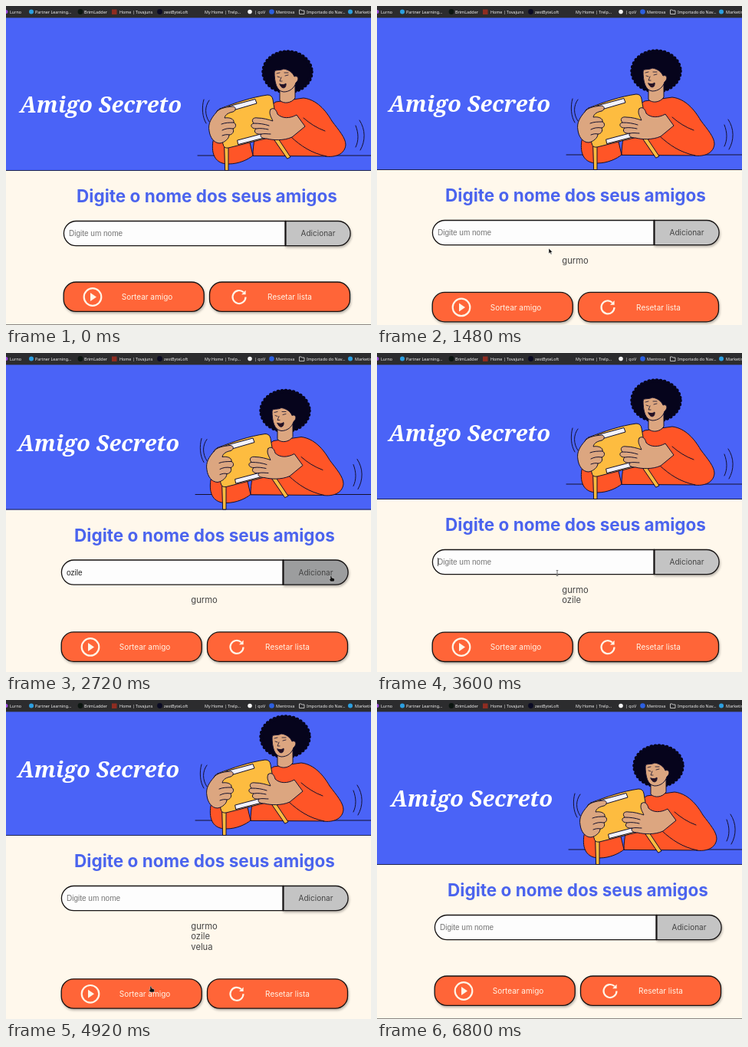
Recreate the animation shown at these times as an HTML page. Size 476 by 416 pixels, loop 7970 ms.

```html
<!DOCTYPE html>
<html lang="pt-BR">
<head>
<meta charset="utf-8">
<title>Amigo Secreto</title>
<style>
  html, body { margin: 0; width: 100%; height: 100%; overflow: hidden; background: #fff8ec; }
  svg { display: block; width: 100%; height: 100%; }
  text { font-family: Inter, sans-serif; white-space: pre; }
  .logo { font: italic 700 29px "Noto Serif", serif; fill: #fff; }
  .heading { font-size: 22.5px; font-weight: 700; fill: #4b64ee; text-anchor: middle; }
  .field { font: 10px "Liberation Sans", sans-serif; }
  .label { font-size: 10px; text-anchor: middle; }
  .list { font-size: 11.2px; fill: #444; }
  .result { font-size: 13.6px; font-weight: 700; fill: #2fdc45; text-anchor: middle; }
  .bar text { font: 500 5.4px "Noto Sans", sans-serif; fill: #eee; }
  .dialog text { font: 5.4px "Noto Sans", sans-serif; fill: #55585c; }
  .dialog .origin { font-size: 7px; font-weight: 500; fill: #26282b; }
  .outline { stroke: #151212; stroke-width: 1.3; }
  .shadow { filter: drop-shadow(1px 2.5px 1.5px rgba(0, 0, 0, .28)); }
  .ink { stroke: #14102c; stroke-width: 1; stroke-linejoin: round; stroke-linecap: round; }
  .line { fill: none; }
  .skin { fill: #dca680; }
  .shirt { fill: #ff5527; }
  .drum { fill: #fdbc40; }
  .icon { fill: none; stroke: #fff4e6; stroke-width: 2.2; }
</style>
</head>
<body>
<svg viewBox="0 0 476 416">
  <rect width="476" height="416" fill="#fff8ec"/>

  <g id="page">
    <rect x="-5" y="0" width="490" height="215" fill="#4a63f7"/>
    <path d="M-5 214.5H485" stroke="#20244e"/>
    <text class="logo" x="18" y="138.5">Amigo Secreto</text>

    <g class="ink">
      <path class="line" d="M250 195H485"/>
      <path class="line" d="M265 123C259 131 259 142 265 151M258 122C255 132 256 145 261 153M456 156C460 166 460 176 456 184M461 149C469 161 469 176 462 188"/>
      <path class="shirt" d="M322 195C322 165 335 135 352 125L388 120C405 122 417 136 425 150C434 162 443 172 443 181C442 193 430 198 416 196Z"/>
      <path class="line" d="M418 196C398 192 384 182 372 171M388 146C396 153 405 159 416 163"/>
      <g fill="#06041c" stroke="#06041c">
        <ellipse cx="367" cy="86" rx="31" ry="26"/>
        <ellipse cx="367" cy="86" rx="31" ry="26" stroke-width="5.5" stroke-dasharray="0 5"/>
      </g>
      <path class="skin" d="M357 106V123C362 128 372 127 377 120V102Z"/>
      <path class="skin" d="M350 86C351 82 357 85 362 82C369 83 374 87 376 92C381 90 383 96 378 100C376 107 370 112 362 112C353 111 350 100 350 86Z"/>
      <path d="M357 102C360 103 363 103 365 101C366 107 360 110 357 102Z" fill="#2a1020"/>
      <path class="line" d="M354 92l3 1M364 91l4-1M353 88l4-1M363 87l5 0M359 93l-2 5 3 0" stroke-width=".8"/>
      <path class="shirt" d="M270 176C267 195 274 206 290 206C304 206 316 200 322 195L318 178Z"/>
      <path class="drum" d="M285 182H290V214.5H286ZM345 167L349 164L371 197L367 199Z"/>
      <path class="drum" d="M279 134C300 126 320 119 341 116Q347 116 348 122L355 163Q356 168 350 170L290 185Q284 186 283 180L274 140Q274 136 279 134Z"/>
      <path d="M290 131L325 121.5L327 127L291 137.5ZM302 175L338 165.5L340 171L303 180.5Z" fill="#f2f2fa"/>
      <path class="skin" d="M274 139C278 133 287 132 295 131C300 131 301 136 296 138C291 139 286 141 285 146C291 145 298 147 297 152C301 154 300 159 296 160C298 164 295 168 291 168C291 173 285 178 279 179C271 179 266 171 265 163C263 153 268 146 274 139Z"/>
      <path class="line" d="M297 152C291 152 286 152 281 154M296 160C290 159 286 160 282 162M291 168C288 167 285 168 282 169"/>
      <path class="skin" d="M345 135C349 131 353 136 354 141C360 147 370 147 379 142L390 157L373 171C362 176 348 175 340 173C334 173 330 170 333 167C326 168 322 164 326 160C319 160 318 154 323 153C319 148 323 145 328 146C335 146 342 148 348 150C346 145 342 140 345 135Z"/>
      <path class="line" d="M323 153C331 153 337 154 343 156M326 160C332 159 337 160 342 161M333 167C337 166 341 167 345 167"/>
    </g>

    <text class="heading" x="262" y="256">Digite o nome dos seus amigos</text>

    <g class="outline">
      <path d="M364.5 280.5H91.5A16 16 0 0 0 91.5 312.7H364.5Z" fill="#fdfdfd"/>
      <path id="add" class="shadow" d="M364.5 280.5H433A16 16 0 0 1 433 312.7H364.5Z"/>
      <path d="M364.5 280.5V312.7" stroke-width="2"/>
    </g>
    <text id="field" class="field" x="82" y="300"></text>
    <path id="caret" d="M82.5 291V302" stroke="#333" stroke-width=".8"/>
    <text class="label" x="407" y="300" fill="#444">Adicionar</text>

    <g id="list" class="list"></g>
    <text id="result" class="result" x="262"></text>

    <g id="actions">
      <g class="outline shadow">
        <rect id="draw" x="75.2" y=".5" width="183" height="38.4" rx="16"/>
        <rect id="reset" x="265.5" y=".5" width="183" height="38.4" rx="16"/>
      </g>
      <circle class="icon" cx="113" cy="20" r="11.3"/>
      <path d="M110 14.5L118 20L110 25.5Z" fill="#fff4e6"/>
      <path class="icon" d="M309.8 13.8A8.5 8.5 0 1 0 312.5 20"/>
      <path d="M312.6 11.2V16.8H307Z" fill="#fff4e6"/>
      <text class="label" x="184" y="23.8" fill="#fff4e6">Sortear amigo</text>
      <text class="label" x="370" y="23.8" fill="#fff4e6">Resetar lista</text>
      <path d="M-5 56H485" stroke="#8b8883"/>
    </g>
  </g>

  <g class="bar">
    <rect width="476" height="15.4" fill="#2c2c2e"/>
    <circle cx="0" cy="7.5" r="2.5" fill="#9b4be0"/>
    <circle cx="33" cy="7.5" r="3" fill="#2c9fe0"/>
    <circle cx="97" cy="7.5" r="3.4" fill="#0b1510"/>
    <rect x="138" y="4.5" width="6.5" height="6.5" fill="#8e2d22"/>
    <circle cx="200.5" cy="7.5" r="3.4" fill="#0a0a23"/>
    <circle cx="318" cy="7.5" r="2.8" fill="#f2f2f2"/>
    <circle cx="346.5" cy="7.5" r="3.3" fill="#2c5fe0"/>
    <path d="M382.5 5h2.5l1 1h3v4.5h-6.5z" fill="none" stroke="#ddd" stroke-width=".8"/>
    <circle cx="449" cy="7.5" r="3" fill="#2c9fe0"/>
    <text x="5" y="9.6">Lurno</text>
    <text x="38" y="9.6">Partner Learning…</text>
    <text x="102" y="9.6">BrimLadder</text>
    <text x="148" y="9.6">Home | Tovajuns</text>
    <text x="206" y="9.6">zestByteLoft</text>
    <text x="259" y="9.6">My Home | Trelp…</text>
    <text x="324" y="9.6">| qoV</text>
    <text x="352" y="9.6">Mentrova</text>
    <text x="392" y="9.6">Importado do Nav…</text>
    <text x="455" y="9.6">Marketing</text>
  </g>

  <g id="dialog" class="dialog">
    <rect class="shadow" x="168" y="-8" width="188" height="69" rx="6" fill="#f6f8fd"/>
    <text class="origin" x="177" y="16.5">challenge-amigo-secreto-g8-one-six.vercel.app says</text>
    <text x="177" y="28.5">Todos os nomes foram sorteados!</text>
    <rect x="318.7" y="36.7" width="29.6" height="16.6" rx="8.3" fill="#fff" stroke="#2b7795" stroke-width="1.4"/>
    <rect x="320.3" y="38.3" width="26.4" height="13.4" rx="6.7" fill="#3d5361"/>
    <text x="333.5" y="47" text-anchor="middle" style="fill:#fff">OK</text>
  </g>

  <g id="cursor">
    <path data-kind="arrow" d="M0 0V7L1.7 5.5L2.8 8L4 7.4L2.9 5H5Z" fill="#111" stroke="#fff" stroke-width=".5"/>
    <path data-kind="hand" d="M-1-3.5L.4-3.7L1-1L4.4.2V2.6L3.6 4H-.8L-2.8.8L-1 .8Z" fill="#111" stroke="#eee" stroke-width=".4"/>
    <path data-kind="beam" d="M-1.3-3.5H1.3M0-3.5V3.5M-1.3 3.5H1.3" fill="none" stroke="#777" stroke-width="1.1"/>
  </g>
</svg>

<script>
const LOOP = 7970, TICK = 40;
const [ana, bia, eva] = ['gurmo', 'ozile', 'velua'];
const el = id => document.getElementById(id);

// time, listed names, drawn name, scroll offset
const layouts = [
  [0, [], '', 0],
  [1240, [ana], '', 1],
  [1640, [ana], '', 10.5],
  [3000, [ana, bia], '', 10.5],
  [3320, [ana, bia], '', 24],
  [4440, [ana, bia, eva], '', 24],
  [4600, [ana, bia, eva], '', 38],
  [5000, [ana, eva], bia, 38],
  [5080, [ana, eva], bia, 40.7],
  [5400, [eva], ana, 27],
  [6440, [], '', 0],
];

// name, first key, delay per key, submit
const typing = [
  [ana, 560, 80, 1240],
  [bia, 1800, 120, 3000],
  [eva, 3680, 80, 4440],
];

// time, x, y, shape from here on
const path = [
  [40, 480, 262, 'arrow'], [360, 235, 296, 'beam'], [920, 235, 296, 'beam'],
  [1120, 418, 298, 'hand'], [1280, 418, 298, 'arrow'], [1480, 224, 316, 'arrow'],
  [1600, 225, 297, 'beam'], [2520, 225, 288, 'beam'], [2680, 424, 294, 'hand'],
  [3080, 424, 294, 'hand'], [3280, 424, 294, 'arrow'], [3560, 235, 287, 'beam'],
  [4160, 235, 287, 'beam'], [4360, 420, 273, 'hand'], [4520, 420, 273, 'arrow'],
  [4880, 189, 377, 'hand'], [5640, 189, 382, 'hand'], [5720, 272, 389, 'hand'],
  [5960, 334, 47, 'arrow'], [6200, 334, 47, 'arrow'], [6400, 330, 386, 'hand'],
  [6480, 330, 386, 'arrow'], [6760, 482, 330, 'arrow'],
];

const within = (t, ...spans) => spans.some(([from, to]) => t >= from && t < to);
const show = (node, on) => node.setAttribute('visibility', on ? 'visible' : 'hidden');
const move = (node, x, y) => node.setAttribute('transform', `translate(${x} ${y})`);
const paint = (id, color) => el(id).setAttribute('fill', color);
const latest = (rows, t) => rows.filter(row => row[0] <= t).pop();

const rows = [0, 1, 2].map(i => {
  const row = document.createElementNS('http://www.w3.org/2000/svg', 'text');
  row.setAttribute('y', 336.5 + 13.7 * i);
  return el('list').appendChild(row);
});

function drawPage(t) {
  const [, names, drawn, scroll] = latest(layouts, t);
  const count = names.length;
  const listHeight = count ? 14.4 + 13.7 * (count - 1) : 0;
  move(el('page'), count ? -3 : 0, -scroll);
  rows.forEach((row, i) => row.textContent = names[i] || '');
  const widest = Math.max(...rows.map(row => row.getComputedTextLength()));
  move(el('list'), 261.5 - widest / 2, 0);
  el('result').textContent = drawn && `Amigo sorteado: ${drawn}`;
  el('result').setAttribute('y', 374.3 + 13.7 * (count - 1));
  move(el('actions'), 0, 359.5 + listHeight + (drawn ? 16.6 : 0));
}

function drawField(t) {
  const entry = typing.find(([, start, , end]) => within(t, [start, end]));
  const typed = entry ? entry[0].slice(0, Math.floor((t - entry[1]) / entry[2]) + 1) : '';
  const field = el('field');
  field.textContent = typed || 'Digite um nome';
  field.setAttribute('fill', typed ? '#222' : '#757575');
  move(el('caret'), typed ? field.getComputedTextLength() : 0, 0);
  show(el('caret'), within(t, [400, 960], [1640, 2360], [3560, 4080]));
}

function drawCursor(t) {
  const next = path.findIndex(key => key[0] > t);
  const visible = next > 0;
  show(el('cursor'), visible);
  const [from, to] = visible ? [path[next - 1], path[next]] : [path[0], path[0]];
  const p = visible ? (t - from[0]) / (to[0] - from[0]) : 0;
  const ease = p * p * (3 - 2 * p);
  move(el('cursor'), from[1] + (to[1] - from[1]) * ease, from[2] + (to[2] - from[2]) * ease);
  for (const shape of el('cursor').children) {
    show(shape, visible && shape.dataset.kind === from[3]);
  }
}

function frame(now) {
  const t = Math.floor(now % LOOP / TICK) * TICK;
  drawPage(t);
  drawField(t);
  drawCursor(t);
  paint('add', within(t, [1080, 1320], [2680, 3320], [4360, 4560]) ? '#9c9d9e' : '#c4c4c4');
  paint('draw', within(t, [4960, 6240]) ? '#e75630' : '#ff6538');
  paint('reset', within(t, [6400, 6520]) ? '#e75630' : '#ff6538');
  show(el('dialog'), within(t, [5640, 6240]));
}

const start = performance.now();
(function loop() {
  frame(performance.now() - start);
  requestAnimationFrame(loop);
})();
</script>
</body>
</html>
```
